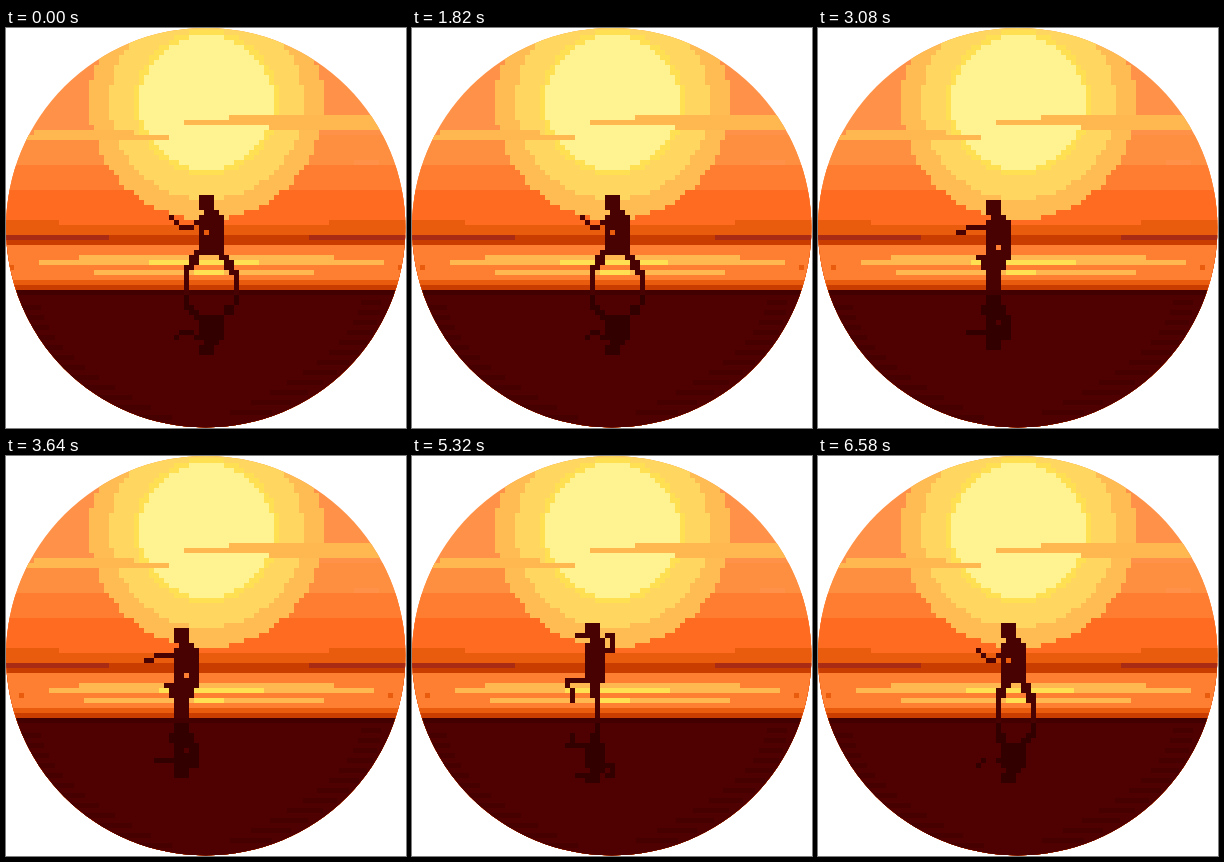
An HTML page that plays this animation: 400 by 400 pixels, repeating every 6.72 s.

```html
<!DOCTYPE html>
<html lang="en">
<head>
<meta charset="utf-8">
<title>Sunset training</title>
<style>
html, body { margin: 0; width: 100%; height: 100%; overflow: hidden; background: #fff; }
svg { display: block; width: 100vw; height: 100vh; }
</style>
</head>
<body>
<svg viewBox="0 0 400 400">
  <clipPath id="disc"><circle cx="199.7" cy="199.7" r="199.7"/></clipPath>
  <g clip-path="url(#disc)" shape-rendering="crispEdges">
    <g id="scene"></g>
    <g id="water"></g>
    <path id="mirror" fill="#330000"/>
    <path id="fighter" fill="#480202"/>
  </g>
</svg>
<script>
const STEP = 140, FRAMES = 48, PX = 5;
const COLS = 24, ROWS = 20, MIRROR_ROWS = 13;
const LEFT = 133, TOP = 167, SHORE = 262;
const CLOUD = '#ffb850', GLOW = '#ffe052';

const $ = id => document.getElementById(id);
const bar = (x1, x2, y, color, h = PX) =>
  `<rect x="${x1}" y="${y}" width="${x2 - x1}" height="${h}" fill="${color}"/>`;

// Disc built from square cells, centred on the sun
function pixelDisc(r, color) {
  let d = '';
  for (let dy = 0.5 - r; dy < r; dy++) {
    const half = Math.floor(Math.sqrt((r - 0.1) ** 2 - dy * dy)) + 0.5;
    d += `M${200.5 - half * PX} ${72 + dy * PX}h${half * 2 * PX}v${PX}h${-half * 2 * PX}z`;
  }
  return `<path d="${d}" fill="${color}"/>`;
}

function drawScene() {
  // Horizontal bands, each running down to the bottom edge
  const bands = {
    0: '#ff9248', 107: '#ff8f40', 137: '#ff7d30', 162: '#ff6b20', 192: '#e95c0d',
    207: '#c93d00', 217: '#ff7f32', 252: '#e95c0d', 257: '#c93d00', 262: '#420000', 267: '#4f0000'
  };
  let s = '';
  for (const y in bands) s += bar(0, 400, y, bands[y], 400 - y);
  s += bar(53, 323, 192, '#ff6b20') + bar(348, 373, 132, '#ff9248');
  s += pixelDisc(23.5, '#ffbc53') + pixelDisc(19.5, '#ffd760') +
    pixelDisc(14.5, GLOW) + pixelDisc(13.5, '#fff290');
  s += bar(28, 128, 102, CLOUD) + bar(0, 163, 107, CLOUD) + bar(223, 400, 87, CLOUD) +
    bar(178, 400, 92, CLOUD) + bar(263, 400, 97, CLOUD);
  s += bar(0, 103, 207, '#a92b14') + bar(303, 400, 207, '#a92b14') + bar(73, 328, 227, CLOUD);
  for (let k = 0; k < 12; k++) {
    const y = 277 + k * 10, inset = 15 + k * k * 0.9, len = 20 + (k * 37) % 35;
    s += bar(inset, inset + len, y, '#470000') + bar(390 - inset - len, 390 - inset, y - PX, '#470000');
  }
  $('scene').innerHTML = s;
}

// The upper glint narrows while the lower one widens
function drawWater(i) {
  const phase = i % 16;
  const d = PX * Math.ceil(Math.min(phase, 16 - phase) * 3 / 8 - 0.3);
  $('water').innerHTML =
    bar(33 + d, 378 - d, 232, CLOUD) + bar(88 - d, 308 + d, 242, CLOUD) +
    bar(143 + d, 253 + d / 2, 232, GLOW) + bar(188, 218, 242, GLOW) +
    bar(3 + d, 8 + d, 237, '#e95c0d') + bar(392 - d, 397 - d, 237, '#e95c0d');
}

const lerp = (a, b, t) => a + (b - a) * t;
const key = (x, y) => x + ',' + y;

function box(set, x, y, w, h) {
  for (let j = 0; j < h; j++) for (let i = 0; i < w; i++) set.add(key(x + i, y + j));
}
// Pixel line through the given joints
function limb(set, w, ...joints) {
  joints.slice(1).forEach(([x2, y2], n) => {
    const [x1, y1] = joints[n];
    const len = Math.ceil(Math.max(Math.abs(x2 - x1), Math.abs(y2 - y1))) || 1;
    for (let t = 0; t <= len; t++)
      box(set, Math.round(lerp(x1, x2, t / len)), Math.round(lerp(y1, y2, t / len)), w, 1);
  });
}
function trunk(x, y, w) {
  const set = new Set();
  box(set, x, y, 3, 3);
  box(set, x + 1, y + 3, 3, 1);
  box(set, x, y + 4, w, 8);
  return set;
}

// x: head column; pull: how far the hand is drawn in, 0 to 1
function stance(x, pull) {
  const set = trunk(x, 0, 5);
  if (pull <= 0.5) set.delete(key(x + 1, 7));
  const hand = x - 6 + 2 * pull, y = 4 + pull;
  limb(set, 1, [hand, y], [hand + 2, y + 2], [hand + 3, y + 2], [x - 1, y + 1]);
  const lean = (x - 9) / 3;
  const hip = Math.round(9 + 2 * lean), foot = Math.round(14 + 5 * lean);
  limb(set, 2, [hip, 11], [9, 14]);
  limb(set, 1, [9, 14], [9, 19]);
  limb(set, 2, [x + 3, 11], [foot - 1, 15]);
  limb(set, 1, [foot, 15], [foot, 19]);
  return set;
}
function lowKick() {
  const set = trunk(7, 1, 5);
  set.delete(key(9, 10));
  limb(set, 1, [7, 6], [3, 6], [1, 7]);
  limb(set, 5, [5, 12], [6, 14]);
  limb(set, 3, [7, 14], [7, 18]);
  return set;
}
function highKnee() {
  const set = trunk(8, 0, 4);
  limb(set, 1, [6, 2], [10, 2]);
  limb(set, 1, [11, 5], [13, 5], [13, 2], [12, 2]);
  limb(set, 1, [8, 11], [4, 11], [4, 12], [5, 13], [5, 15]);
  limb(set, 2, [9, 12], [9, 14]);
  limb(set, 1, [10, 14], [10, 18]);
  return set;
}

// Two strikes, each with a step in before it and a step out after it
function pose(i) {
  const first = i < 32;
  const gap = Math.abs(i - (first ? 23.5 : 40));
  if (gap <= 2.5) return first ? lowKick() : highKnee();
  const away = Math.min(1, Math.max(0, (gap - 5) / 2.6));
  const x = 9 + Math.round(3 * away ** 3);
  const guard = i < 16 ? 0.5 - 0.5 * Math.cos(i * Math.PI / 8) : 0;
  return stance(x, x < 12 ? 0.5 : guard);
}

const cell = (x, y) => `M${LEFT + x * PX} ${y}h${PX}v${PX}h${-PX}z`;
function drawFighter(set) {
  let body = '', image = '';
  for (let x = 0; x < COLS; x++) {
    for (let y = 0; y < ROWS; y++) if (set.has(key(x, y))) body += cell(x, TOP + y * PX);
    for (let k = 0; k < MIRROR_ROWS; k++) {
      const row = Math.floor(ROWS - (k + 0.5) * ROWS / MIRROR_ROWS);
      if (set.has(key(x, row))) image += cell(x, SHORE + k * PX);
    }
  }
  $('fighter').setAttribute('d', body);
  $('mirror').setAttribute('d', image);
}

let last = -1;
function render(ms) {
  const i = Math.floor(ms / STEP) % FRAMES;
  if (i === last) return;
  last = i;
  drawWater(i);
  drawFighter(pose(i));
}

drawScene();
const start = performance.now();
function tick() {
  render(Math.max(0, performance.now() - start));
  requestAnimationFrame(tick);
}
tick();
</script>
</body>
</html>
```
